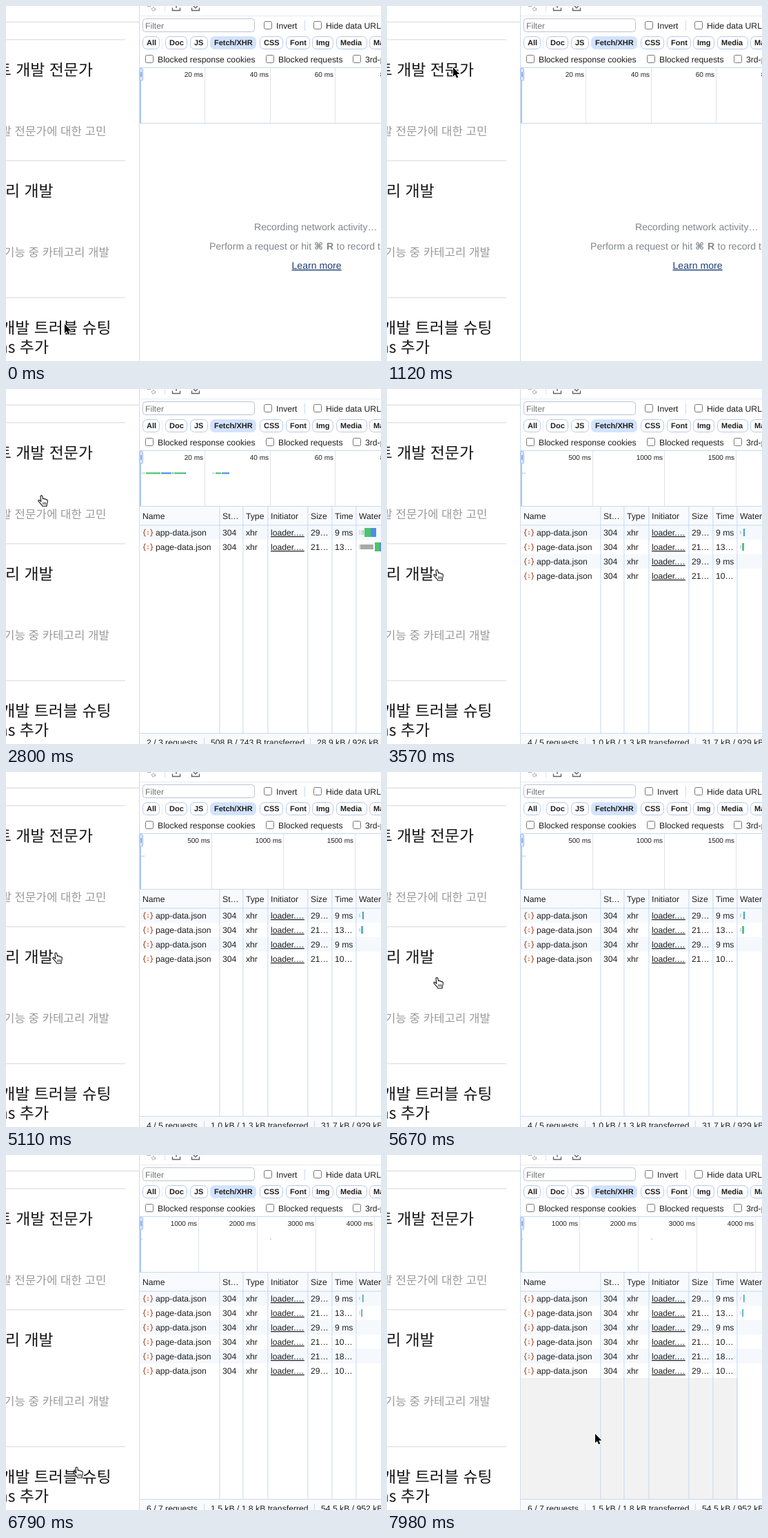
Recreate the animation shown at these times as an HTML page. Size 544 by 516 pixels, loop 8 s.

```html
<!DOCTYPE html>
<html lang="ko">
<head>
<meta charset="utf-8">
<style>
  html, body { margin: 0; width: 100%; height: 100%; overflow: hidden; background: #fff; }
  svg { display: block; width: 544px; height: 516px; font: 12.2px "Liberation Sans", Arial, sans-serif; text-rendering: geometricPrecision; }
  text { fill: #1f1f1f; white-space: pre; }
  .title { font: 22.9px "Noto Sans CJK KR", "Noto Sans CJK", sans-serif; fill: #161616; text-anchor: end; }
  .sub { font: 16.8px "Noto Sans CJK KR", "Noto Sans CJK", sans-serif; fill: #9a9a9a; text-anchor: end; }
  .pill { font-size: 11px; font-weight: bold; }
  .tick { font-size: 10px; text-anchor: end; }
  .hint { font-size: 14.1px; fill: #80868b; }
  .key { font-weight: bold; }
  .cmd { font: bold 14.1px "DejaVu Sans", sans-serif; fill: #80868b; }
  .link { fill: #1f3f77; text-decoration: underline; }
  .source { text-decoration: underline; }
  .filter { fill: #757575; }
</style>
</head>
<body>
<svg id="stage" viewBox="0 0 544 516"></svg>
<script>
const LOOP = 8000, TICK = 70;
const GRID = '#c8d8f2', GREEN = '#4bc46a', BLUE = '#4a90e2', TEAL = '#41a3c4', GREY = '#b0b0b0', PALE = '#d4d8dc';

const text = (x, y, s, cls = '') => `<text x="${x}" y="${y}" class="${cls}">${s}</text>`;
const rect = (x, y, w, h, fill, extra = '') =>
  `<rect x="${x}" y="${y}" width="${w}" height="${h}" fill="${fill}" ${extra}/>`;
const vline = (x, y, h, color = GRID) => rect(x, y, 1, h, color);
const hline = (y, color = GRID) => rect(194, y, 350, 1, color);
const group = (id, body) => `<g id="${id}">${body}</g>`;
const checkbox = (x, y, label) =>
  rect(x + .5, y + .5, 11, 11, '#fff', 'rx="2" stroke="#767676"') + text(x + 18, y + 10.5, label);
const pill = ([x, w, label]) => {
  const on = label === 'Fetch/XHR';
  return rect(x + .5, 44.5, w, 18, on ? '#d3e3fd' : '#fff', `rx="6" stroke="${on ? '#d3e3fd' : '#b5c8ea'}"`) +
    text(x + 6, 57, label, 'pill');
};
// list: [x, width, color] along one line
const bars = (y, h, list) => list.map(([x, w, c]) => rect(x, y, w, h, c)).join('');

function article() {
  const rules = [48, 224, 423].map(y => rect(0, y, 173, 1.6, '#e5e5e5')).join('');
  return rect(0, 22.5, 193, 1.6, '#e3e3e3') + rules +
    text(126, 101, '에이전트 개발 전문가', 'title') +
    text(145.5, 187.5, '개발 전문가에 대한 고민', 'sub') +
    text(68.5, 277, '카테고리 개발', 'title') +
    text(150, 363.5, '기능 중 카테고리 개발', 'sub') +
    text(152.5, 476, '개발 트러블 슈팅', 'title') +
    text(62, 504, 'ns 추가', 'title');
}

function toolbar() {
  const icon = 'fill="none" stroke="#5f6368" stroke-width="1.4"';
  const pills = [[198, 24, 'All'], [231, 31, 'Doc'], [267, 25, 'JS'], [296, 66, 'Fetch/XHR'], [368, 33, 'CSS'],
    [406, 34, 'Font'], [444, 30, 'Img'], [479, 44, 'Media'], [527, 60, 'Manifest']];
  return vline(193, 0, 516, '#d3dcea') + hline(14, '#e6ebf4') +
    `<path d="M205 1q3-2 5 0" ${icon} opacity=".5"/>
     <circle cx="214" cy="4.5" r="2.4" ${icon} opacity=".6" stroke-dasharray="2 1"/>
     <path d="M241.5 2.5v4h11v-4M247 0v3M269.5 2.5v4h11v-4M272 0l3 3 3-3" ${icon}/>` +
    vline(230, 0, 8, '#d8e0ee') +
    rect(198.5, 18.5, 162, 19, '#fff', 'rx="4" stroke="#bcc3ce"') + text(202, 33, 'Filter', 'filter') +
    checkbox(374, 22, 'Invert') + vline(433, 21, 15) + checkbox(446, 22, 'Hide data URLs') +
    vline(226, 45, 17, '#e6edf8') + pills.map(pill).join('') +
    checkbox(202, 71, 'Blocked response cookies') + checkbox(377, 71, 'Blocked requests') +
    checkbox(503, 71, '3rd-party requests') + hline(89) + hline(170);
}

function overview({ first, gap, unit, marks }) {
  let out = bars(121.3, 2.2, marks);
  for (let i = 0; first + gap * i < 544 + gap; i++) {
    const x = Math.round(first + gap * i);
    out += vline(x, 90, 80, '#dfe3e8') + text(x - 2, 103, `${unit * (i + 1)} ms`, 'tick');
  }
  return out;
}

const handle = () => rect(194, 90, 2, 80, '#a8c7fa') +
  rect(193.5, 90.5, 5, 18, '#d3e3fd', 'rx="2" stroke="#9dbdf2"') + vline(195.5, 96, 7, '#4c6fae');

const emptyState = () =>
  text(360, 326, 'Recording network activity…', 'hint') +
  text(295, 354, 'Perform a request or hit', 'hint') + text(447, 354, '⌘', 'cmd') +
  text(465, 354, 'R', 'hint key') + text(479.5, 354, 'to record the reload.', 'hint') +
  text(414.5, 382, 'Learn more', 'hint link');

const COLUMNS = [198, 314, 348, 384, 442, 477, 512];
const DIVIDERS = COLUMNS.slice(1).map(x => x - 4.6);
const cells = (y, list) =>
  list.map((s, i) => text(COLUMNS[i], y, s, s.startsWith('loader') ? 'source' : '')).join('');
const jsonIcon = y => `<g transform="translate(206 ${y}) scale(1.08)" fill="none" stroke="#bd6445" stroke-width="1.2">
  <path d="M-3-4.5q-2 0-2 2v1q0 1.5-1.5 1.5q1.5 0 1.5 1.5v1q0 2 2 2M3-4.5q2 0 2 2v1q0 1.5 1.5 1.5q-1.5 0-1.5 1.5v1q0 2-2 2"/>
  <path d="M0-2.3v1.5M0 .8v2"/></g>`;

const REQUESTS = [['app', '29…', '9 ms'], ['page', '21…', '13…'], ['app', '29…', '9 ms'],
  ['page', '21…', '10…'], ['page', '21…', '18…'], ['app', '29…', '10…']];

function table({ count, status, fall }) {
  const rows = REQUESTS.slice(0, count).map(([name, size, time], i) => {
    const y = 198 + 21 * i;
    return (i % 2 ? '' : rect(194, y, 350, 21, '#f5f9fd')) + jsonIcon(y + 11) +
      text(217, y + 15, name + '-data.json') +
      cells(y + 15, ['', '304', 'xhr', 'loader.…', size, time]);
  }).join('');
  const [requests, transferred, resources, split] = status;
  return rect(194, 171, 350, 27, '#f8fafd') + rows +
    cells(189, ['Name', 'St…', 'Type', 'Initiator', 'Size', 'Time', 'Waterfall']) +
    hline(197.5) + DIVIDERS.map(x => vline(x, 171, 329)).join('') +
    fall.map(([y, h, list]) => bars(y, h, list)).join('') +
    rect(194, 500, 350, 16, '#f8fafd') + hline(500) +
    text(204, 518, requests) + vline(287, 507, 9) + text(297, 518, transferred) +
    vline(split, 507, 9) + text(split + 10, 518, resources);
}

const VIEWS = [
  { at: 0, first: 288, gap: 94.6, unit: 20, marks: [] },
  { at: 1260, first: 288, gap: 94.6, unit: 20, count: 2,
    marks: [[197, 5, PALE], [203, 21, GREEN], [225, 15, BLUE], [241, 2, GREEN], [244, 15, GREEN], [259, 2, BLUE],
      [299, 4, PALE], [304, 8, GREEN], [313, 11, BLUE]],
    status: ['2 / 3 requests', '508 B / 743 B transferred', '28.9 kB / 926 kB resources', 441],
    fall: [[205, 7, [[512.5, 1.5, PALE], [515, 1.5, PALE], [517.5, 1.5, GREY]]],
      [202, 13, [[520, 9, GREEN], [529, 8, BLUE]]],
      [226, 7, [[512, 1.5, PALE], [514, 19, '#a9a9a9']]], [223, 13, [[535, 7, GREEN], [542, 2, BLUE]]]] },
  { at: 3570, first: 298, gap: 104, unit: 500, count: 4,
    marks: [[196, 2, PALE], [199, 2, PALE]],
    status: ['4 / 5 requests', '1.0 kB / 1.3 kB transferred', '31.7 kB / 929 kB resources', 447],
    fall: [[206, 5, [[512, 2, PALE]]], [203, 11, [[517, 2, TEAL]]],
      [227, 5, [[512, 2, PALE]]], [224, 11, [[515, 1.5, GREEN], [516.5, 1.5, TEAL]]]] },
  { at: 6790, first: 279, gap: 85, unit: 1000, count: 6,
    marks: [[196, 1.5, PALE], [383.5, 1, GREY]],
    status: ['6 / 7 requests', '1.5 kB / 1.8 kB transferred', '54.5 kB / 952 kB resources', 447],
    fall: [[206, 5, [[512, 1.5, PALE]]], [203, 11, [[517, 1.6, TEAL]]],
      [227, 5, [[512.5, 1.5, PALE]]], [224, 11, [[515.3, 1.6, TEAL]]]] },
];

const hoverFill = () => rect(194, 324, 313, 176, '#f2f2f2') +
  DIVIDERS.map(x => vline(x, 324, 176)).join('');

const arrow = `<path d="M0 0V14.8L3.3 11.7L5.5 16.9L8 15.8L5.8 10.8H10.4Z" transform="translate(0 -.8) scale(.9)"
  stroke="#fff" stroke-width="1.8" paint-order="stroke" stroke-linejoin="round"/>`;
const hand = `<path d="M4 2.6C3.7.6 6.4.2 6.8 2L7.5 5.8C8.3 4.8 9.7 5 10 6.2C10.8 5.5 12 5.9 12.2 7
  C13.3 6.6 14.3 7.2 14.3 8.3C14.5 10.3 14.2 11.7 13.2 13.3V16.2H6.7C6.5 14.7 4.6 13.4 3.3 11.7
  C2.5 10.5 1.4 9.6.9 8.7C.5 7.6 1.8 7 2.8 7.8L4.9 9.6Z"
  fill="#fff" stroke="#111" stroke-width="1.1" stroke-linejoin="round"/>
  <path d="M7.7 10.5V14M9.6 10.5V14M11.5 10.5V14" stroke="#111" stroke-width=".8"/>`;

// [ms, x, y, shape]; positions between keys are interpolated on the tick
const PATH = [
  [0, 85, 463, 'arrow'], [70, 97, 415, 'arrow'], [210, 157, 178, 'arrow'], [280, 157, 178, 'arrow'],
  [350, 171, 118, 'arrow'], [420, 197, 10, 'arrow'], [490, 200, -60, 'arrow'], [1050, 200, -60, 'arrow'],
  [1120, 96, 90, 'arrow'], [1190, 62, 136, 'hand'], [1260, 46, 154, 'hand'], [3290, 46, 154, 'hand'],
  [3360, 49, 172, 'hand'], [3500, 64, 246, 'hand'], [3570, 67, 262, 'hand'], [5320, 67, 262, 'hand'],
  [5670, 67, 298, 'hand'], [5880, 67, 298, 'hand'], [6160, 75, 342, 'hand'], [6510, 92, 430, 'hand'],
  [6720, 97, 452, 'hand'], [6790, 97, 453, 'hand'], [7770, 97, 453, 'hand'],
  [7840, 136, 445, 'hand'], [7910, 244, 418, 'arrow'], [7980, 302, 406, 'arrow'],
];

document.getElementById('stage').innerHTML = article() + toolbar() +
  VIEWS.map((v, i) => group('view' + i, overview(v) + (v.count ? table(v) : emptyState()))).join('') +
  handle() + group('hover', hoverFill()) + group('arrow', arrow) + group('hand', hand);

const byId = id => document.getElementById(id);
const show = (id, on) => byId(id).setAttribute('visibility', on ? 'visible' : 'hidden');

function cursorAt(ms) {
  const i = PATH.findLastIndex(k => k[0] <= ms);
  const a = PATH[i], b = PATH[i + 1] || a;
  const p = b === a ? 0 : (ms - a[0]) / (b[0] - a[0]);
  return { x: a[1] + (b[1] - a[1]) * p, y: a[2] + (b[2] - a[2]) * p, shape: a[3] };
}

function draw() {
  const t = performance.now() % LOOP;
  const ms = Math.floor(t / TICK) * TICK;
  const current = VIEWS.findLastIndex(v => v.at <= ms);
  VIEWS.forEach((v, i) => show('view' + i, i === current));
  show('hover', ms >= 7910);
  const { x, y, shape } = cursorAt(ms);
  for (const id of ['arrow', 'hand']) {
    show(id, id === shape);
    byId(id).setAttribute('transform', `translate(${x} ${y})`);
  }
  requestAnimationFrame(draw);
}
draw();
</script>
</body>
</html>
```
